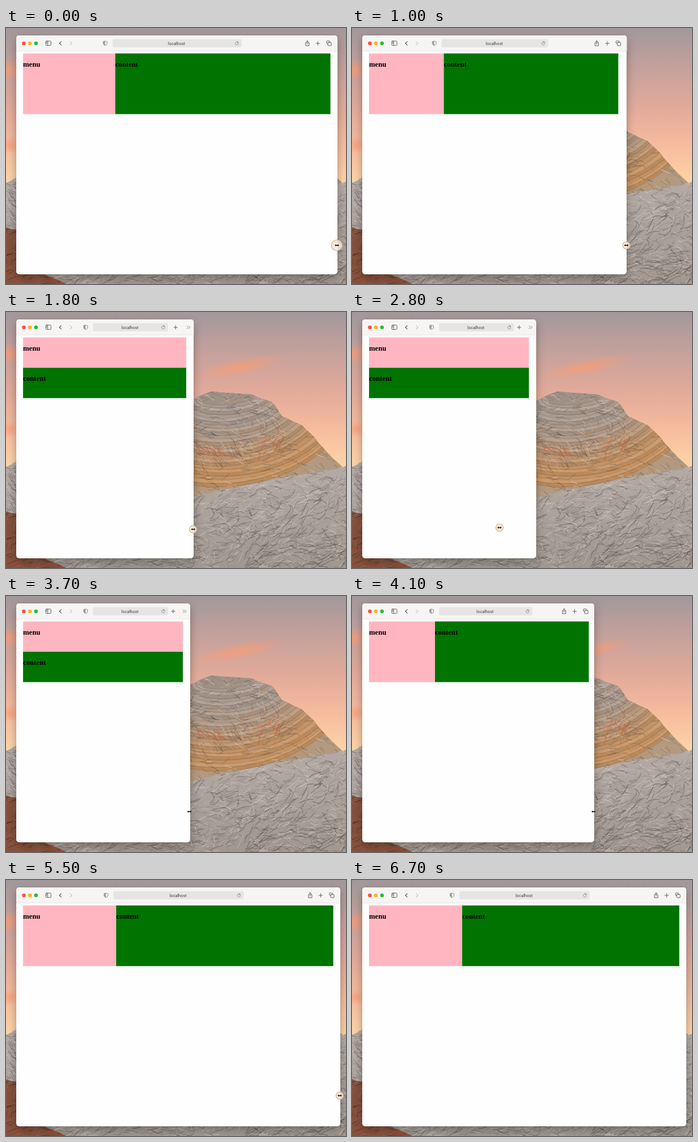
An HTML page with a canvas that plays this animation: 598 px wide and 450 px high, repeating every 6900 ms.

```html
<!DOCTYPE html>
<html lang="en">
<head>
<meta charset="utf-8">
<title>Resizing a two-column layout</title>
<style>
  html, body { margin: 0; width: 100%; height: 100%; overflow: hidden; background: #a49a9c; }
  canvas, svg { position: absolute; left: 0; top: 0; width: 598px; height: 450px; display: block; }
  #win { position: absolute; left: 18px; top: 13px; height: 420px; border-radius: 5px; background: #fefefe;
    box-shadow: 0 0 1px rgba(0,0,0,.5), 0 6px 16px rgba(0,0,0,.3); }
  .ico { fill: none; stroke: #55524f; stroke-width: .9; stroke-linecap: round; stroke-linejoin: round; }
  .pale { stroke: #8a8684; }
  .url { font: 7px Inter, Roboto, sans-serif; fill: #33302f; text-anchor: middle; }
  .head { font: bold 12.7px "Liberation Serif", "Times New Roman", serif; fill: #000; }
</style>
</head>
<body>
<canvas id="wall" width="598" height="450"></canvas>
<div id="win"></div>
<svg viewBox="0 0 598 450">
  <path id="bar" fill="#f7f5f3"/>
  <path id="rule" stroke="#e4e1df" stroke-width=".8"/>
  <circle cx="31.4" cy="27" r="3.3" fill="#fe4f47"/>
  <circle cx="42" cy="27" r="3.3" fill="#fdb024"/>
  <circle cx="52.7" cy="27" r="3.3" fill="#27bd36"/>
  <g class="ico">
    <rect x="69.9" y="23" width="9.2" height="7.6" rx="1.2"/>
    <path d="M73.2 23V30.5M71 25H72M71 26.7H72"/>
    <path d="M97.2 23.8L93.9 27L97.2 30.2" stroke-width="1.1"/>
    <path d="M112.8 23.8L116 27L112.8 30.2" stroke="#aaa7a5"/>
  </g>
  <g id="shield">
    <path class="ico pale" d="M0-4L3.5-2.8V0Q3.5 2.8 0 4Q-3.5 2.8-3.5 0V-2.8Z"/>
    <path d="M0-4V4Q-3.5 2.8-3.5 0V-2.8Z" fill="#a5a19f"/>
  </g>
  <rect id="field" y="19.5" height="14.5" rx="3" fill="#e7e5e3"/>
  <text id="url" class="url" y="29.6">localhost</text>
  <g id="reload" class="ico pale"><path d="M2.4-1.4A2.8 2.8 0 1 0 2.8 .5M.4-3.6L2.6-1.4L.2-.6"/></g>
  <g id="share" class="ico"><path d="M-1.4-1.4H-3V4.2H3V-1.4H1.4M0 1.5V-4.6M-1.8-2.9L0-4.7L1.8-2.9"/></g>
  <g id="plus" class="ico"><path d="M-3.3 0H3.3M0-3.3V3.3"/></g>
  <g id="tabs" class="ico">
    <rect x="-1.9" y="-1.7" width="6" height="5.8" rx="1"/>
    <path d="M-2-.1H-3.2Q-4.2-.1-4.2-1V-3.2Q-4.2-4.2-3.2-4.2H.5Q1.5-4.2 1.5-3.2V-1.9"/>
  </g>
  <g id="more" class="ico pale"><path d="M-2.7-2.6L-.2 0L-2.7 2.6M.5-2.6L3 0L.5 2.6"/></g>
  <rect id="menu" x="30" y="44.7" fill="#ffb6c1"/>
  <rect id="content" fill="#007300"/>
  <text class="head" x="30" y="67.5">menu</text>
  <text id="title" class="head">content</text>
  <g id="cursor">
    <circle id="ring" fill="#f3e9da" fill-opacity=".85" stroke="#cdae85" stroke-width="1.2"/>
    <path d="M-3.8 0L-1.5-1.9V-.8H1.5V-1.9L3.8 0L1.5 1.9V.8H-1.5V1.9Z" fill="#111"/>
  </g>
</svg>
<script>
const $ = id => document.getElementById(id);
const LOOP = 6900, STEP = 100;
const SCALE = 8 / 15;            // stage pixels per page pixel
const TOP = 44.7, ROW = 100 * SCALE;

const clamp = p => Math.min(1, Math.max(0, p));
const span = (t, a, b) => clamp((t - a) / (b - a));
const smooth = p => p * p * (3 - 2 * p);
const easeOut = p => 1 - (1 - p) ** 2;
const bump = p => Math.sin(Math.PI * p) ** 2;

// right side of the window: drawn in, then pulled out again
const edge = t => 583 - 259.5 * smooth(span(t, 300, 1960)) + 264.5 * easeOut(span(t, 3720, 5467));

const set = (id, attrs) => { for (const k in attrs) $(id).setAttribute(k, attrs[k]); };
const place = (id, x, y = 27) => set(id, { transform: `translate(${x} ${y})` });
const show = (id, on) => { $(id).style.display = on ? "" : "none"; };

function drawToolbar(right) {
  const width = right - 18;
  $("win").style.width = width + "px";
  set("bar", { d: `M18 40V18Q18 13 23 13H${right - 5}Q${right} 13 ${right} 18V40Z` });
  set("rule", { d: `M18 40.4H${right}` });

  const long = Math.max(132, width * .402);
  const left = Math.max(153, 18.5 + (width - long) / 2);
  set("field", { x: left, width: long });
  set("url", { x: left + long / 2 - 1 });
  place("shield", left - 13);
  place("reload", left + long - 8.3);

  const tight = right < 348;
  show("share", !tight);
  show("tabs", !tight);
  show("more", tight);
  place("share", right - 53);
  place("tabs", right - 15);
  place("more", right - 9.5);
  place("plus", tight ? Math.max(294, right - 32) : right - 34.5);
}

function drawPage(page) {
  const size = page - 30, wide = page - 6 >= 768 * SCALE;
  const part = wide ? size * .3 : size, h = wide ? ROW * 2 : ROW;
  const x = wide ? 30 + part : 30, y = wide ? TOP : TOP + ROW;
  set("menu", { width: part, height: h });
  set("content", { x, y, width: page - x, height: h });
  set("title", { x, y: y + 22.8 });
}

function drawCursor(t, right) {
  const away = span(t, 6300, 6500);
  const x = right - 1 - 63 * bump(span(t, 2200, 3400)) + 30 * away;
  place("cursor", x, 382 - 3 * span(t, 1800, 2800) - 190 * away);
  set("ring", { r: 6.5 + 3 * (1 - span(t, 0, 600)) });
  show("ring", t < 3700 || t > 4400 && t < 6300);
  show("cursor", away < 1);
}

function render(t) {
  drawToolbar(edge(t));
  drawPage(edge(t + 12) - 12.4);   // the page runs slightly ahead of the frame
  drawCursor(t, edge(t));
}

function paintWall() {
  const g = $("wall").getContext("2d");
  let seed = 7;
  const rnd = () => (seed = (seed * 16807) % 2147483647) / 2147483647;
  const between = (a, b) => a + (b - a) * rnd();

  const sky = g.createLinearGradient(0, 0, 0, 280);
  ["#a1989b", "#c4a19c", "#e2aa9a", "#f7bd9f", "#fdd8a8"].forEach((c, i) => sky.addColorStop(i / 4, c));
  g.fillStyle = sky;
  g.fillRect(0, 0, 598, 450);

  function cloud(x, y, rx, ry, tilt) {
    g.save();
    g.translate(x, y); g.rotate(tilt); g.scale(rx, ry);
    const fade = g.createRadialGradient(0, 0, 0, 0, 0, 1);
    fade.addColorStop(0, "rgba(250,156,118,.8)");
    fade.addColorStop(1, "rgba(250,156,118,0)");
    g.fillStyle = fade;
    g.fillRect(-1, -1, 2, 2);
    g.restore();
  }
  cloud(412, 97, 85, 15, -.2);
  cloud(4, 74, 32, 20, 0);
  cloud(8, 206, 16, 15, 0);

  // split each side in half, nudging the middle, so a few points make a rough outline
  function rough(pts, depth = 3, amount = 2) {
    if (!depth) return pts;
    const out = [];
    pts.forEach(([x, y], i) => {
      out.push([x, y]);
      const n = pts[i + 1];
      if (n) out.push([(x + n[0]) / 2 + between(-1, 1) * amount, (y + n[1]) / 2 + between(-1, 1) * amount]);
    });
    return rough(out, depth - 1, amount / 2);
  }
  function rock(outline, fill, detail) {
    g.save();
    g.beginPath();
    rough(outline).forEach(p => g.lineTo(...p));
    g.lineTo(598, 450);
    g.lineTo(0, 450);
    g.fillStyle = fill;
    g.fill();
    g.clip();
    detail();
    g.restore();
  }
  // wavy strokes along a heading
  function cracks(n, x0, y0, x1, y1, heading, length, colors) {
    for (let i = 0; i < n; i++) {
      let x = between(x0, x1), y = between(y0, y1);
      let a = heading + Math.sin(x / 37 + y / 23) * .4;
      const step = between(.4, 1) * length / 5;
      g.beginPath();
      g.moveTo(x, y);
      for (let k = 0; k < 5; k++) {
        a += between(-.4, .4);
        g.lineTo(x += Math.cos(a) * step, y += Math.sin(a) * step);
      }
      g.strokeStyle = colors[i % colors.length];
      g.lineWidth = between(.5, 1.6);
      g.stroke();
    }
  }
  const ash = ["rgba(84,74,70,.42)", "rgba(214,204,197,.5)", "rgba(120,108,102,.3)"];
  const rust = ["rgba(214,140,72,.5)", "rgba(126,82,54,.4)", "rgba(196,168,142,.5)"];
  const red = ["rgba(56,34,28,.5)", "rgba(186,80,44,.55)", "rgba(140,116,106,.5)"];

  rock([[250, 215], [322, 157], [362, 140], [432, 145], [467, 158], [486, 184], [520, 199], [556, 237], [592, 273]],
    "#b2997f", () => {
      // strata hang below the summit, warmer with depth
      for (let k = 24; k >= 0; k--) {
        const warm = smooth(span(k, 6, 22)), tone = k % 3 * 9;
        g.beginPath();
        g.ellipse(395, 148, 55 + k * 7, 14 + k * 6, -.12 + Math.sin(k) * .03, 0, 2 * Math.PI);
        g.fillStyle = `rgb(${160 + tone + 26 * warm},${145 + tone - 8 * warm},${134 + tone - 44 * warm})`;
        g.fill();
        g.strokeStyle = `rgba(96,80,70,${.25 + k % 2 * .2})`;
        g.stroke();
      }
      cracks(240, 310, 140, 480, 250, .25, 20, ash);
      cracks(90, 380, 150, 490, 260, -.6, 20, rust);
      cracks(260, 323, 190, 590, 320, .5, 22, rust);
      cracks(120, 323, 230, 590, 320, .3, 22, ash);
      cracks(22, 335, 233, 375, 248, .35, 14, ["rgba(200,92,52,.75)"]);
      cracks(22, 440, 225, 485, 262, -.4, 14, ["rgba(200,92,52,.65)"]);
    });

  const stone = g.createLinearGradient(0, 270, 0, 450);
  stone.addColorStop(0, "#b4aba6");
  stone.addColorStop(1, "#a0978f");
  rock([[0, 272], [18, 262], [323, 327], [420, 305], [515, 287], [598, 271]], stone, () => {
    cracks(850, 310, 270, 610, 450, -.38, 30, ash);
    cracks(350, 310, 285, 610, 450, .7, 13, ash);
    cracks(90, 420, 390, 610, 450, -.3, 28, ["rgba(66,58,54,.4)"]);
    cracks(90, -5, 264, 24, 354, .5, 18, ash);
    cracks(200, 0, 430, 330, 455, -.25, 26, ash);
  });
  rock([[0, 350], [18, 354], [40, 420], [110, 452]], "#85503c", () => cracks(200, -5, 350, 110, 452, -.5, 20, red));
}

paintWall();
const start = performance.now();
function tick() {
  const t = (performance.now() - start) % LOOP;
  render(Math.floor(t / STEP) * STEP);
  requestAnimationFrame(tick);
}
render(0);
requestAnimationFrame(tick);
</script>
</body>
</html>
```
